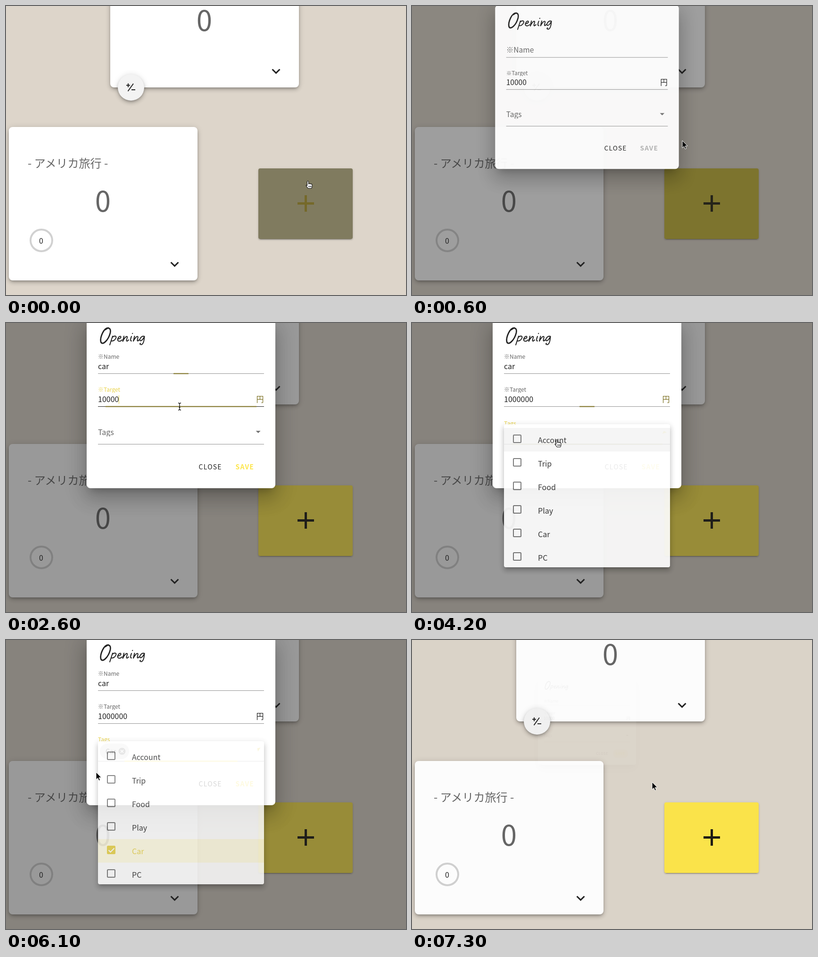
Animation of 848x614 px, one loop 7400 ms. Source, as an HTML page:

```html
<!DOCTYPE html>
<html lang="ja">
<head>
<meta charset="utf-8">
<style>
html, body { margin: 0; width: 100%; height: 100%; overflow: hidden; background: #ddd5ca; }
svg { display: block; width: 848px; height: 614px; font-family: "Noto Sans CJK JP", "Noto Sans CJK", "Noto Sans", sans-serif; }
text { white-space: pre; font-size: 16px; fill: #212121; }
</style>
</head>
<body>
<svg id="stage" viewBox="0 0 848 614"></svg>
<script>
const LOOP = 7400, STEP = 100;
const YELLOW = '#fde64b', ACCENT = '#e8d24a', OLIVE = '#7d7124', GREY = '#666';
const ITEMS = ['Account', 'Trip', 'Food', 'Play', 'Car', 'PC'];

// Moments of the interaction
const OPEN = 440, NAME_ON = 1250, TARGET_ON = 2433, TAGS_ON = 4033,
      PICK = 5350, TAGS_OFF = 6066, MENU_OFF = 6083, RESET = 7082, LEAVE = 7130;

const LIFT = {
  button: [[3, 1, -2, .2], [2, 2, 0, .14], [1, 5, 0, .12]],
  card: [[3, 5, -1, .2], [5, 8, 0, .14], [1, 14, 0, .12]],
  menu: [[5, 5, -3, .2], [8, 10, 1, .14], [3, 14, 2, .12]],
  dialog: [[11, 15, -7, .2], [24, 38, 3, .14], [9, 46, 8, .12]]
};

const rect = (x, y, w, h, r, fill, more = '') =>
  `<rect x="${x}" y="${y}" width="${w}" height="${h}" rx="${r}" fill="${fill}" ${more}/>`;
const path = (d, more) => `<path d="${d}" ${more}/>`;
const text = (x, y, s, more = '') => `<text x="${x}" y="${y}" ${more}>${s}</text>`;

function panel(x, y, w, h, r, lift, fill, more) {
  const shade = LIFT[lift].map(([dy, blur, spread, a]) =>
    rect(x - spread, y + dy - spread, w + 2 * spread, h + 2 * spread, r, '#000',
      `opacity="${a}" style="filter:blur(${blur / 2}px)"`)).join('');
  return shade + rect(x, y, w, h, r, fill, more);
}

const chevron = (x, y) => path('M7.41 8.58L12 13.17L16.59 8.58L18 10L12 16L6 10Z',
  `transform="translate(${x} ${y}) scale(1.5)" fill="#212121"`);
const bigZero = (x, y) => text(x, y, '0', `text-anchor="middle" style="font-size:60px;font-weight:300;fill:${GREY}"`);

function page() {
  return rect(0, 0, 848, 614, 0, '#ddd5ca') +
    panel(221, -153, 400, 326, 8, 'card', '#fff') + bigZero(420.5, 52.5) + chevron(554.5, 120.6) +
    panel(237, 145, 56, 56, 28, 'card', '#f3f3f3') +
    path('M255 168.5h8M259 164.5v8M266 178h8M258.5 181L270 165', 'stroke="#212121" stroke-width="2" fill="none"') +
    panel(6, 257, 400, 326, 8, 'card', '#fff') +
    text(46, 343, '- アメリカ旅行 -', `style="font-size:24px;fill:${GREY}"`) +
    bigZero(205.5, 436.5) + chevron(339.5, 530.6) +
    '<circle cx="75" cy="498" r="23" fill="none" stroke="#d1d1d1" stroke-width="4"/>' +
    text(74.5, 504.5, '0', 'text-anchor="middle"') +
    panel(535, 345, 200, 150, 4, 'button', YELLOW, 'id="add"') +
    path('M618 419.5h35M635.5 402v35', 'id="plus" stroke-width="5"') +
    rect(0, 0, 848, 614, 0, '#212121', 'id="scrim"');
}

const title = () =>
  `<g fill="none" stroke="#222" stroke-linecap="round" stroke-linejoin="round">` +
  path('M217 10.5C207 10 199 31 201 40C204 49 217 37 221 21C223 11 217 8 211 14', 'stroke-width="2.8"') +
  path('M226 28L220 46.5M225 31C229 26 235 27 233 32C231 37 226 39 223 38' +
    'M236.5 34C241 34 245 31 243 28.5C240 27 236 33 237 37C239 40 243 39 246 36' +
    'M250 28L247.500 39C250 33 255 27 257 29C258 31 253 39 257 38.500L260 36' +
    'M266 28.500C264 33 263 39 266 38M268 22.500l.3 -.4' +
    'M272.500 28L270 38.500C273 33 277 27 279.500 29C281 31 276 39 280 38L282 36' +
    'M293.500 28.500C287 26 282 35 284.500 37.500C288 39 292 32 293.500 28.500C293 36 291 45 287 46C284 46 283 44.500 285 43', 'stroke-width="2"') +
  '</g>';

const field = (id, y) =>
  rect(195, y - .5, 352, 1, 0, '#949494', `id="${id}Line"`) +
  rect(195, y - 1, 352, 2, 0, OLIVE, `id="${id}Bar"`) +
  `<g id="${id}Label"><text clip-path="url(#labelClip)" id="${id}Caption"></text></g>`;

function dialog() {
  return '<g id="dialog">' + panel(171, -7, 400, 358, 8, 'dialog', '#fff') + title() +
    field('name', 107.5) + field('target', 177.5) + field('tags', 257.5) +
    text(195, 98, '', 'id="nameText"') + text(195, 168, '', 'id="targetText"') +
    text(530.5, 168, '円', 'id="unit"') + rect(0, 0, 1, 18, 0, ACCENT, 'id="caret"') +
    path('M-5 -2.5L0 2.5L5 -2.5Z', 'id="arrow"') +
    '<g id="chip">' + rect(199, 220, 62, 33, 16.5, '#e0e0e0') +
    text(211, 242, 'Car', 'style="font-size:14px"') +
    '<circle cx="246" cy="236.500" r="7.500" fill="#777"/>' +
    path('M243 233.500l6 6m0 -6l-6 6', 'stroke="#fff" stroke-width="1.6"') + '</g>' +
    rect(478, 288, 59, 34.5, 14, YELLOW, 'id="ripple"') +
    text(408.5, 311, 'CLOSE', 'style="font-size:14px;font-weight:500;letter-spacing:1.25px"') +
    text(486.5, 311, 'SAVE', 'id="save" style="font-size:14px;font-weight:700;letter-spacing:1.25px"') +
    '</g>';
}

function menu() {
  const rows = ITEMS.map((s, i) => {
    const y = 223 + 50 * i, end = i === 5 ? 46 : 50;
    return rect(195, y, 352, end, 0, '#000', `id="row${i}"`) +
      rect(215, y + 15, 16, 16, 1.5, 'none', `id="box${i}" stroke="#707070" stroke-width="2"`) +
      text(267, y + 32, s, `id="item${i}"`);
  }).join('');
  return '<g id="menu">' + panel(195, 215, 352, 304, 4, 'menu', '#fff') + rows +
    path('M217.500 446.500l4 4l8 -8', 'id="tick" fill="none" stroke="#fff" stroke-width="2"') + '</g>';
}

const pointers = () =>
  path('M0 0V15.5L3.600 12.2L6 17.800L8.600 16.7L6.200 11.200H11Z', 'id="arrowCursor" fill="#000" stroke="#fff"') +
  path('M-3 -7.500Q0 -7.500 0 -5.500Q0 -7.500 3 -7.500M0 -5.500V5.500M-3 7.500Q0 7.500 0 5.500Q0 7.500 3 7.500M-1.500 2h3',
    'id="beamCursor" fill="none" stroke="#111" stroke-width="1.3"') +
  path('M-1.500 8V1Q0 -1.500 1.500 1V6Q3 4.500 4.200 6Q6 5 7 6.500Q9 6 9 8.500V11Q9 13 7.500 15.500H0.500L-3.800 10Q-4 7.500 -1.500 9.500ZM2 10v3M4.500 10v3M6.700 10v3',
    'id="handCursor" fill="#fff" stroke="#111" stroke-width="1.1"');

const stage = document.getElementById('stage');
stage.innerHTML = '<defs><clipPath id="labelClip"><rect x="-2" y="-20" width="200" height="23"/></clipPath></defs>' +
  page() + dialog() + menu() + pointers();

const el = {};
stage.querySelectorAll('[id]').forEach(n => el[n.id] = n);
const set = (id, attrs) => { for (const k in attrs) el[id].setAttribute(k, attrs[k]); };
const tint = (id, c) => { el[id].style.fill = c; };
const show = (id, on) => set(id, { visibility: on ? 'visible' : 'hidden' });
const write = (id, s) => { if (el[id].textContent !== s) el[id].textContent = s; };

function bezier(x1, y1, x2, y2) {
  const at = (a, b, u) => 3 * a * u * (1 - u) ** 2 + 3 * b * u * u * (1 - u) + u ** 3;
  return x => {
    if (x <= 0) return 0;
    if (x >= 1) return 1;
    let lo = 0, hi = 1;
    for (let i = 0; i < 24; i++) {
      const mid = (lo + hi) / 2;
      if (at(x1, x2, mid) < x) lo = mid; else hi = mid;
    }
    return at(y1, y2, lo);
  };
}
const swing = bezier(.25, .8, .5, 1), zoom = bezier(.25, .8, .25, 1);
const ease = (t, start, curve = swing) => curve((t - start) / 300);

function keys(t, list) {
  let i = 0;
  while (i < list.length - 2 && t >= list[i + 1][0]) i++;
  const [t0, ...a] = list[i], [t1, ...b] = list[i + 1];
  const p = Math.min(1, Math.max(0, (t - t0) / (t1 - t0)));
  return a.map((v, k) => v + (b[k] - v) * p);
}
const rgb = c => `rgb(${c.map(Math.round)})`;

const ADD = [[0, 128, 123, 95], [400, 128, 123, 95], [600, 196, 180, 57], [1000, 253, 230, 75]];
const PLUS = [[0, 117, 105, 42], [400, 117, 105, 42], [600, 40, 38, 22], [800, 30, 28, 20]];
const POINTER = [[0, 640, 372], [300, 640, 372], [600, 573, 286], [900, 573, 286], [1200, 420, 92],
  [2200, 420, 92], [2400, 368, 177.5], [3700, 368, 177.5], [4000, 309, 238], [4200, 307, 248],
  [4700, 307, 248], [5200, 300, 445], [5600, 300, 445], [6000, 191, 281], [6100, 191, 281], [6700, 509, 302]];

function drawField(id, t, caption, on, off, low, high, raised) {
  const active = t >= on && t < off;
  const w = 352 * (ease(t, on) - ease(t, off));
  set(id + 'Bar', { x: 371 - w / 2, width: w });
  set(id + 'Line', { fill: active ? '#222' : '#949494' });
  set(id + 'Label', { transform: `translate(195 ${low + (high - low) * raised}) scale(${1 - raised / 4})` });
  write(id + 'Caption', caption);
  tint(id + 'Caption', active ? ACCENT : GREY);
}

function drawForm(t) {
  const done = t >= RESET, back = ease(t, RESET);
  drawField('name', t, '※Name', NAME_ON, TARGET_ON, 97.5, 76, ease(t, NAME_ON) - back);
  drawField('target', t, '※Target', TARGET_ON, TAGS_ON, 168, 146, 1);
  drawField('tags', t, 'Tags', TAGS_ON, TAGS_OFF, 238, 216, ease(t, TAGS_ON) - back);
  set('tagsBar', { fill: t < 5000 ? OLIVE : YELLOW });
  if (t >= TAGS_OFF && t < 6200) tint('tagsCaption', ACCENT);

  const name = done ? '' : 'car'.slice(0, Math.max(0, Math.floor((t - 1300) / 200)));
  const target = '10000' + (done || t < 3300 ? '' : t < 3500 ? '0' : '00');
  write('nameText', name);
  write('targetText', target);
  tint('unit', t >= TARGET_ON && t < 4300 ? OLIVE : '#212121');

  const inName = t >= NAME_ON && t < TARGET_ON, inTarget = t >= TARGET_ON && t < TAGS_ON;
  const since = t - (inName ? NAME_ON : TARGET_ON);
  show('caret', (inName || inTarget) && since % 1000 < 500);
  set('caret', inName
    ? { x: 195 + [0, 8.2, 17.2, 23.500][name.length], y: 84 }
    : { x: 194.500 + 8.88 * target.length, y: 153.500 });

  const turn = 180 * (ease(t, TAGS_ON) - ease(t, TAGS_OFF));
  set('arrow', {
    transform: `translate(534.700 231.500) rotate(${turn})`,
    fill: t >= TAGS_ON && t < 6300 ? ACCENT : '#757575'
  });
  show('chip', t >= PICK && !done);
  tint('save', t >= 1500 ? YELLOW : '#b5b5b5');
  set('ripple', { opacity: keys(t, [[6600, 0], [6700, .08], [6900, .08], [7100, .35], [7300, .35]])[0] });
}

function drawMenu(t, px, py) {
  set('menu', { opacity: ease(t, TAGS_ON) - ease(t, MENU_OFF) });
  const hover = px > 195 && t >= TAGS_ON ? Math.floor((py - 223) / 50) : -1;
  const picked = t >= PICK;
  ITEMS.forEach((s, i) => {
    const on = picked && s === 'Car';
    set('row' + i, { fill: on ? YELLOW : '#000', opacity: on ? .16 : i === hover ? .04 : 0 });
    set('box' + i, { fill: on ? ACCENT : 'none', stroke: on ? ACCENT : '#707070' });
    tint('item' + i, on ? ACCENT : '#2a2a2a');
  });
  show('tick', picked);
}

function drawPointer(t, x, y) {
  const kind = t < 450 ? 'hand' : t < 1050 ? 'arrow' : t < 4000 ? 'beam' : t < 5900 ? 'hand' : 'arrow';
  const typing = t >= 1500 && t < 2200 || t >= 3200 && t < 3700;
  for (const k of ['hand', 'arrow', 'beam']) {
    show(k + 'Cursor', k === kind && !typing);
    set(k + 'Cursor', { transform: `translate(${x} ${y})` });
  }
}

function draw(t) {
  set('add', { fill: rgb(keys(t, ADD)) });
  set('plus', { stroke: rgb(keys(t, PLUS)) });
  set('scrim', { opacity: .46 * (ease(t, OPEN, zoom) - ease(t, RESET)) });
  const open = ease(t, OPEN, zoom) - ease(t, LEAVE, zoom);
  set('dialog', {
    opacity: open,
    transform: `translate(371 172) scale(${.5 + open / 2}) translate(-371 -172)`
  });
  const [x, y] = keys(t, POINTER);
  drawForm(t);
  drawMenu(t, x, y);
  drawPointer(t, x, y);
}

const start = performance.now();
function tick() {
  const t = (performance.now() - start) % LOOP;
  draw(Math.floor(t / STEP) * STEP);
  requestAnimationFrame(tick);
}
tick();
</script>
</body>
</html>
```
